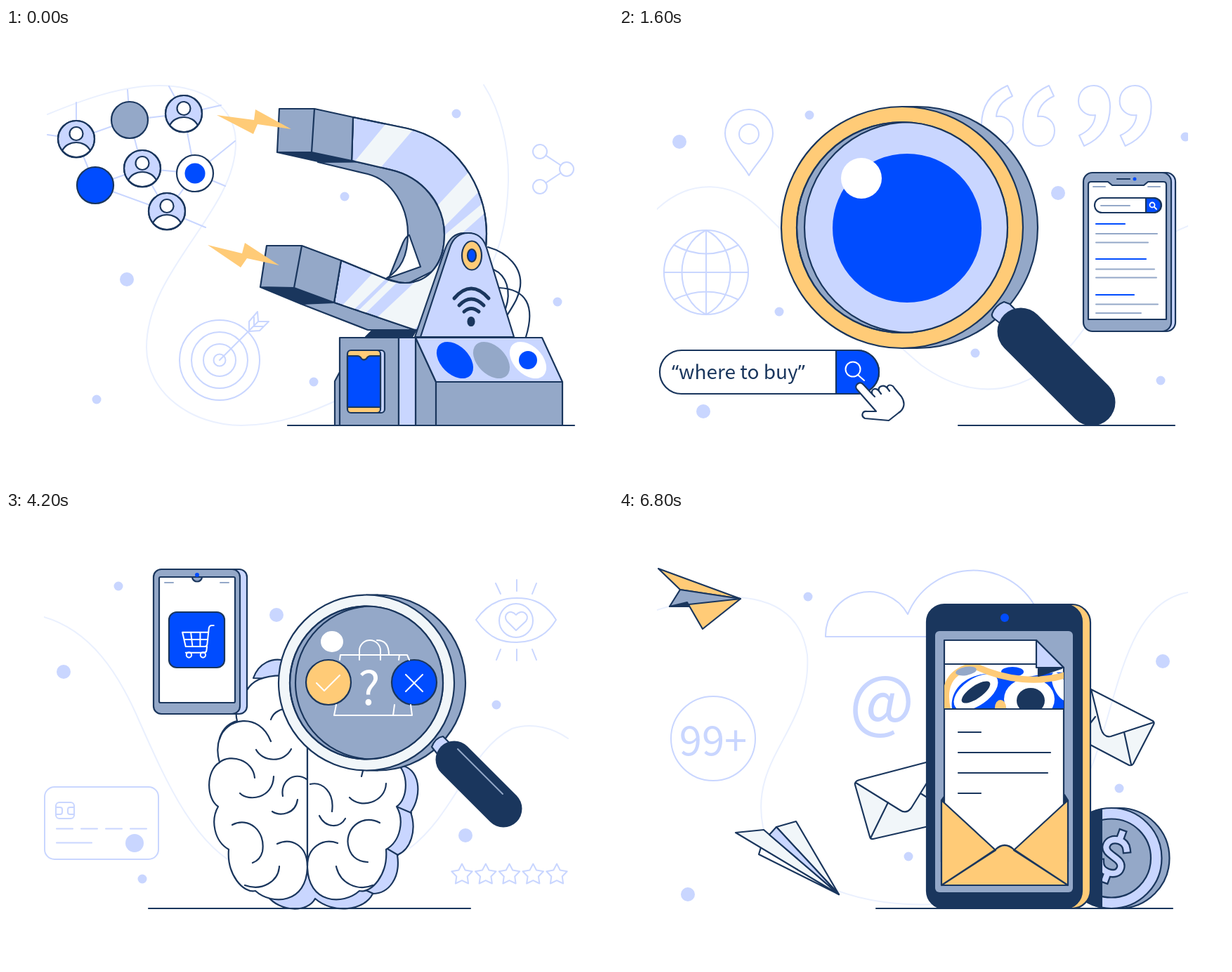
An HTML page that plays this animation: 864x648 px, repeating every 8 s.

```html
<!DOCTYPE html>
<html lang="en">
<head>
<meta charset="utf-8">
<title>Marketing scenes</title>
<style>
html, body { margin: 0; width: 100%; height: 100%; overflow: hidden; background: #fff; }
svg { display: block; width: 100vw; height: 100vh; }
text { font-family: 'Noto Sans CJK KR', 'Noto Sans CJK JP', 'Noto Sans', sans-serif; stroke: none; }
</style>
</head>
<body>
<svg id="stage" viewBox="0 0 864 648" fill="none" stroke="#1a365d" stroke-width="2.2" stroke-linecap="round" stroke-linejoin="round"></svg>
<script>
const navy = '#1a365d', blue = '#004cff', lilac = '#c9d6ff', slate = '#94a8c8',
  gold = '#ffcb77', ice = '#f1f6f9', white = '#fff', pale = '#eaf0fe';

// Shapes inherit fill and stroke from their group unless a fill is given.
const paint = f => f ? ` fill="${f}"` : '';
const p = (d, f) => `<path d="${d}"${paint(f)}/>`;
const c = (x, y, r, f) => `<circle cx="${x}" cy="${y}" r="${r}"${paint(f)}/>`;
const e = (x, y, rx, ry, f, turn = 0) =>
  `<ellipse cx="${x}" cy="${y}" rx="${rx}" ry="${ry}" transform="rotate(${turn} ${x} ${y})"${paint(f)}/>`;
const r = (x, y, w, h, rx, f) => `<rect x="${x}" y="${y}" width="${w}" height="${h}" rx="${rx}"${paint(f)}/>`;
const text = (x, y, size, s, f, more = '') => `<text x="${x}" y="${y}" font-size="${size}" fill="${f}" ${more}>${s}</text>`;
const g = (attrs, ...body) => `<g ${attrs}>${body.flat(9).join('')}</g>`;
const move = (m, ...body) => g(`transform="${m}"`, body);
const flip = (sum, ...body) => move(`matrix(-1 0 0 1 ${sum} 0)`, body);
const pen = (color, w, ...body) => g(`stroke="${color}" stroke-width="${w}"`, body);
const light = (...body) => pen(lilac, 2, body);
const flat = (f, ...body) => g(`fill="${f}" stroke="none"`, body);
const ground = (a, b) => p(`M${a} 566H${b}`);
const dots = list => flat(lilac, list.map(([x, y, k = 6.5]) => c(x, y, k)));

let clips = 0;
function clip(shape, ...body) {
  const id = 'clip' + clips++;
  return `<clipPath id="${id}">${shape}</clipPath>` + g(`clip-path="url(#${id})"`, body);
}
const wave = d => clip(r(54, 81, 756, 486, 0), pen(pale, 2, p(d)));

// Closed polygon from polar points [degrees, radius].
const polar = (x, y, pts) => 'M' + pts.map(([a, k]) => {
  const t = a * Math.PI / 180;
  return `${(x + k * Math.cos(t)).toFixed(1)} ${(y + k * Math.sin(t)).toFixed(1)}`;
}).join('L') + 'Z';
const times = (n, f) => Array.from({ length: n }, (_, i) => f(i));
const star = (x, y, k) => p(polar(x, y, times(10, i => [i * 36 - 90, i % 2 ? k * 0.52 : k])));

function dollar(m, f, stroke, edge) {
  const d = p('M12-14C9-20 4-21 0-21C-8-21-13-16-13-10C-13 3 13-3 13 11C13 17 8 21 0 21C-6 21-11 18-13 13M0-22V-30M0 22V30');
  return g(`transform="${m}" stroke-linecap="square"`, pen(stroke, 7 + edge * 2, d), pen(f, 7, d));
}

const cart = [
  p('M310 398H302Q291 398 289 410L282 478Q281 488 272 488H190L176 427H288M183 458H285M212 427L219 488M252 427V488M281 488L279 505Q278 514 268 514H190'),
  c(204, 524, 11), c(264, 524, 11)];

const badge = (x, y, k, f, core) => [c(x, y, k, f), core ? flat(core, c(x, y, k * 0.56)) : ''];

const user = (x, y) => move(`translate(${x} ${y})`, c(0, 0, 26, lilac),
  p('M-20 17C-13 1 13 1 20 17A26 26 0 0 1-20 17Z', white), c(0, 0, 26), c(0, -7.5, 9.5, white));

function magnet() {
  const body = p('M494 127L571 143C640 158 684 225 684 293C684 375 632 430 582 430L467 391L477 331L540 357C550 361 558 363 568 363C602 363 624 335 624 294C624 250 592 212 548 202L492 189Z', lilac);
  return [
    p('M545 356L565 306Q569 297 574 295L590 340ZM444 191L515 208C550 217 572 255 572 293C572 325 562 344 541 357L570 365L640 330L630 230L548 190ZM420 393L515 430H582L467 388Z', slate),
    p('M512 440L522 430H584L578 440Z', navy), body,
    clip(body, flat(ice, p('M494 193L550 125L581 143L528 205ZM600 268L668 195L684 222L612 295ZM618 300L690 240V256L620 318ZM474 400L526 345L546 352L484 412ZM520 420L600 345L634 330L640 370L580 430ZM492 412L548 357L557 362L502 416Z'))),
    body.replace(lilac, 'none'),
    p('M386 177H435L492 189L444 190ZM362 369L410 370L467 391L420 393Z', navy),
    p('M389 115H439L435 177H386ZM439 115L494 127L492 189L435 177ZM371 310H421L410 370L362 369ZM421 310L477 331L467 391L410 370Z', slate)];
}

function magnetScene() {
  const hub = [[100, 158], [176, 131], [253, 122], [194, 200], [269, 207], [127, 224], [229, 261]];
  const links = ['01', '12', '05', '13', '24', '34', '35', '36', '46', '56'].map(([a, b]) => `M${hub[a]}L${hub[b]}`).join('');
  const share = [[760, 176], [798, 201], [760, 226]];
  return [
    pen(pale, 2, p('M59 123C110 102 165 82 218 82C285 82 328 115 327 165C326 262 200 345 200 455C200 520 265 566 335 566C390 566 440 545 480 526M680 81C705 120 716 170 715 218C714 260 708 300 692 335')),
    light(p(links + 'M59 152L100 158V106M176 131L173 88M306 110L253 122L232 83M326 161L269 207L312 225M229 261L284 284'),
      p('M' + share.join('L')), share.map(s => c(...s, 10, white)),
      [57, 40, 23, 8.5].map(k => c(304, 473, k)),
      p('M304 473L359 418M346 432V418L358 404L359 418H374L361 431ZM353 412V425H367')),
    [0, 2, 3, 6].map(i => user(...hub[i])),
    badge(...hub[1], 26, slate), badge(...hub[4], 26, white, blue), badge(...hub[5], 26, blue),
    dots([[641, 122], [482, 240], [172, 358, 10], [785, 390], [438, 504], [129, 529]]),
    p('M686 312C715 320 735 342 732 368C730 384 722 395 714 408M694 344C712 352 720 374 711 400M702 370C740 372 754 395 740 440'),
    magnet(),
    flat(gold, p('M300 124L353 131L355 116L406 144L358 137L352 151ZM287 309L336 321L340 306L389 338L343 328L334 341Z')),
    p('M582 440L625 315C631 298 640 292 652 292H662L640 440Z', slate),
    p('M590 440L632 312C637 298 647 292 658 292C672 292 680 300 684 313L723 440Z', lilac),
    e(663, 324, 14, 20.5, gold), e(663, 324, 6, 9, blue),
    pen(navy, 5, p('M638 385Q662 357 687 385M645 395Q662 377 680 395M652 404Q662 395 673 404')), e(662, 418, 4.5, 6, navy),
    p('M468 566V503L475 490V441H559V566ZM475 490V566M583 441L612 504V566H583ZM612 504H792V566H612Z', slate),
    p('M559 441H583V566H559ZM583 441H763L792 504H612Z', lilac),
    [[639, blue], [691, slate], [743, white]].map(([x, f]) => flat(f, e(x, 473, 31, 20, f, 45))),
    flat(blue, c(743, 473, 13)),
    r(493, 459, 46, 89, 5, lilac), r(486, 459, 47, 89, 5, gold),
    p('M486 467H500Q504 467 506 471Q509 474 513 471Q515 467 519 467H533V540H486Z', blue),
    ground(401, 809)];
}

function pie(x, colors) {
  const cuts = [-90, -20, 31, 60, 185, 270];
  return colors.map((f, i) => p(polar(x, 302, [[0, 0], ...times(41, k => [cuts[i] + (cuts[i + 1] - cuts[i]) * k / 40, 81])]), f));
}

function adScene() {
  const bar = (x, y) => [r(x, y, 37, 186 - y, 0, slate), r(x, y, 27, 186 - y, 0, lilac)];
  const arm = 'M243 566C252 545 262 532 262 520C261 480 254 425 258 398C262 375 283 350 300 325C318 300 322 285 318 250C317 235 325 230 334 231C346 232 353 238 356 244';
  const palm = 'M353 425C378 455 388 505 386 566';
  const head = 'V154Q368 147 375 147H592Q599 147 599 154V';
  return [
    wave('M54 134C110 165 135 225 165 290C190 340 225 375 257 420M628 514C740 460 735 330 810 224'),
    dots([[150, 131, 10], [61, 226], [214, 430], [665, 155, 10], [697, 282]]),
    bar(188, 153), bar(236, 128), bar(284, 82), p('M175 186H335'),
    p('M620 210C640 195 658 190 669 194C681 200 682 217 672 226C650 240 640 255 620 271Z', ice),
    p('M620 484C640 462 652 456 660 446H620ZM500 103H592A35 35 0 0 1 627 138V566H500Z', slate),
    p('M355 566V137A34 34 0 0 1 389 103H577A34 34 0 0 1 611 137V566Z', gold),
    p(`M368 566${head}566Z`, lilac), p(`M368 197${head}197Z`, ice), r(382, 160, 202, 24, 12),
    r(386, 216, 195, 139, 5, white), p('M386 329V220Q386 216 390 216H577Q581 216 581 220V329Z', navy),
    pen(blue, 2.4, c(483, 273, 28)), pen(white, 4, p('M477 265V282L492 273.5Z', white)),
    flat(white, p('M385 566V380Q385 376 389 376H579Q583 376 583 380V566Z')),
    pen(slate, 2, p('M396 172H547M404 342H573M396 415.5H563M396 433.5H544')), p('M419 395H446'),
    flat(blue, c(484, 126, 7), c(399, 342, 6), r(385, 446, 198, 100, 0)),
    flat(gold, c(403, 394, 8)), flat(white, r(397, 457.5, 47, 7, 3.5)),
    text(573, 475, 25, 'Ad', white, 'font-weight="700" text-anchor="end"'),
    flat(ice, p(arm + 'V428L353 425' + palm.slice(8) + 'Z')), p(arm + 'V372L345 412' + palm),
    pie(226, [navy, blue, slate, slate, slate]), pie(215, [navy, blue, lilac, slate, white]),
    p('M606 302C606 288 620 280 645 270C660 265 672 273 672 290C672 308 665 313 650 318C630 326 607 328 606 302ZM605 360C605 345 620 336 645 330C662 326 671 338 671 352C671 370 662 376 645 379C625 385 606 384 605 360ZM603 428C603 412 615 405 640 401C658 398 666 410 666 428C666 445 655 450 638 451C615 453 603 445 603 428Z', ice),
    badge(773, 151, 35, white, blue), badge(744, 358, 35, blue), badge(203, 508, 35, slate),
    light(p('M107 371L70 405C50 425 51 455 70 469C92 484 116 478 130 463L162 426L149 413L122 446C114 456 106 459 95 456C77 451 70 430 83 417L120 384ZM94 383L107 396M149 441L136 429'),
      p('M684 495L695 547Q696 551 701 551H789Q794 551 795 547L804 495'), r(679, 485, 130, 10, 1, white),
      p('M716 488L738 448L746 452L726 488ZM771 488L750 448L742 452L763 488Z', white),
      times(4, i => r(705 + i * 23.5, 502, 7, 41, 3.5))),
    ground(169, 695)];
}

// Loupe: x is the front ring, dx the depth of its rim, inset that of the glass.
const loupe = (x, y, k, hole, dx, inset, rim, glass) => [
  c(x + dx, y, k, slate), p(`M${x} ${y - k}h${dx}M${x} ${y + k}h${dx}`),
  c(x, y, k, rim), c(x, y, hole, slate), clip(c(x, y, hole), c(x + inset, y, hole, glass)), c(x, y, hole)];

function searchScene() {
  const quote = p('M676 82C690 82 699 95 699 112C699 140 685 158 662 168L655 153C668 147 677 138 678 124C664 126 654 116 654 104C654 91 663 82 676 82Z');
  const mark = s => `<tspan font-family="Noto Sans, sans-serif">${s}</tspan>`;
  return [
    wave('M54 258C100 215 160 215 205 262C280 335 370 430 430 480C500 530 560 520 610 485C680 430 710 320 810 282'),
    clip(r(54, 81, 756, 486, 0), dots([[86, 162, 10], [271, 124], [228, 404], [120, 546, 10], [507, 463], [625, 235, 10], [771, 502], [806, 155]])),
    light(p('M185 210C175 192 151 172 151 150A34 34 0 0 1 219 150C219 172 195 192 185 210Z'), c(185, 151, 14),
      c(124, 348, 60), p('M124 288V408M64 348H184M124 288C78 310 78 386 124 408C170 386 170 310 124 288M78 309Q124 334 170 309M78 387Q124 364 170 387'),
      ['', 'translate(58.6)', 'rotate(180 607.5 125)', 'rotate(180 637 125)'].map(m => move(m, quote))),
    loupe(403, 284, 172, 150, 21, 11, gold, lilac),
    flat(blue, c(410, 285, 106)), flat(white, c(345, 214, 29)),
    p('M531 407C533 400 540 393 548 390L556 393L566 403L543 421L533 413Q530 410 531 407Z', lilac),
    pen(navy, 67, p('M572 432L673 533')), ground(483, 791),
    r(58, 459, 312, 62, 31, white), p('M309 459H339A31 31 0 0 1 339 521H309Z', blue),
    text(75, 500, 28, mark('“') + 'where to buy' + mark('”'), navy),
    pen(white, 2, c(333, 486, 10.5), p('M340 494L349 502')),
    p('M338 514C335 508 343 502 348 508L361 522C357 515 365 511 370 517C368 510 377 507 382 513C381 507 389 507 392 513L402 525C408 534 406 543 398 548L384 559L350 556C344 553 346 545 353 546H366ZM361 522L364 525M370 517L373 521M382 513L385 517', white),
    r(671, 206, 121, 226, 13, lilac), r(661, 206, 125, 226, 13, slate),
    p('M668 223Q668 219 672 219H696L702 224H747L753 219H775Q779 219 779 223V415H668Z', white),
    p('M709 215H727'), flat(blue, c(734, 215, 2.5)),
    r(677, 242, 95, 21, 10.5, white), p('M750 242H761A10.5 10.5 0 0 1 761 263H750Z', blue),
    pen(white, 1.8, c(759, 252, 3.5), p('M762 255L765 258')),
    pen(slate, 2, p('M675 226H692M753 226H770M686 253H727M679 293H766M679 305.5H753M679 343.5H762M679 355.5H765M679 393.5H767M679 406H743')),
    pen(blue, 2.2, p('M679 279H720M679 329H750M679 380H733'))];
}

function shoe(m) {
  const laces = p('M512 330C530 314 548 318 558 317M508 337C525 322 540 324 552 323M516 326L530 336M525 320L538 330M535 317L545 326');
  return move(m,
    p('M468 362C490 358 505 345 520 330C530 318 537 310 543 316C550 328 570 335 592 318L599 325C602 345 607 355 610 372V386H500Z', ice),
    p('M480 378C520 382 545 376 565 368C585 370 598 362 605 357L610 388H490Z', lilac),
    p('M532 376C545 362 565 359 580 359C592 357 598 350 602 345L605 356C595 367 580 371 565 369C550 368 542 375 532 376ZM499 344L510 334L526 336L518 346Z', blue),
    p('M545 338C558 325 580 326 588 345C582 357 562 358 545 349ZM497 352L536 354L512 377L494 373L510 360Z', slate),
    p('M536 320C540 300 570 298 574 320L566 325L557 318L545 322ZM574 326L579 311L595 322L592 331ZM458 370C461 358 472 358 478 363C488 374 515 380 545 384L610 387V389H478C458 386 455 380 458 370Z', navy),
    pen(navy, 5, laces), pen(white, 1.8, laces));
}

function shopScene() {
  const step = 47.6, edge = i => 341 + i * step, stripe = i => i % 2 ? gold : slate;
  const scallop = (x, w, y, base, f) => p(`M${x} ${y}V${base}a${w / 2} ${w / 2} 0 0 0 ${w} 0V${y}Z`, f);
  return [
    wave('M54 110C160 115 240 180 290 260C330 325 350 390 400 445M667 514C730 500 780 465 810 423'),
    dots([[712, 116, 10], [319, 160], [74, 284], [720, 357], [332, 534, 10], [804, 517]]),
    r(151, 190, 300, 177, 26, lilac), r(178, 228, 44, 39, 9, gold),
    p('M178 237.5H187Q193 237.5 193 243V253Q193 258 187 258H178M178 247.5H193M222 237.5H213Q207 237.5 207 243V253Q207 258 213 258H222M207 247.5H222'),
    p('M180 292H221M240 292H281M300 292H341M360 292H400M180 327H266'), flat(blue, c(366, 329, 21)),
    light(cart, c(735, 238, 54), c(735, 238, 42)), dollar('translate(736 238)', white, lilac, 2),
    r(400, 83, 265.5, 483, 30, slate), p('M655 159V212'), r(385, 83, 261, 483, 26, navy), flat(white, r(397, 105, 236, 433, 6)),
    clip(r(397, 180, 236, 90, 0), flat(navy, p('M409 230V218Q409 213 414 213L440 200H633V232H409Z'),
      times(5, i => scallop(409 + i * step, step, 220, 232)))),
    p('M632 106L579 178H632Z', slate),
    times(5, i => p(`M${397 + i * 47} 106h47L${edge(i + 1)} 178H${edge(i)}Z`, i % 2 ? gold : lilac)),
    times(5, i => scallop(edge(i), step, 178, 190, stripe(i))),
    scallop(579, 27, 178, 199, slate), scallop(606, 26, 178, 199, slate),
    r(405, 266, 219, 147, 0, gold), shoe('translate(-40 -3)'), shoe(''),
    p('M406 432H504'), pen(slate, 2, p('M406 454.5H616')), flat(blue, r(404, 483, 222, 41, 6)), pen(white, 2, p('M469 503H557')),
    ground(295, 754)];
}

function brainScene() {
  const half = p('M429 238C395 232 350 230 340 262C330 270 325 285 329 299C304 305 297 335 304 358C284 370 285 410 302 421C291 440 296 470 317 482C314 518 338 545 355 541C378 562 429 560 429 505Z', white);
  return [
    wave('M54 151C120 170 160 230 190 300C230 390 270 480 340 510M575 480C640 430 660 340 720 310C750 300 780 310 800 324'),
    dots([[160, 107], [82, 229, 10], [385, 148, 10], [194, 524], [654, 462, 10], [698, 276]]),
    p('M352 238C360 215 380 210 392 212L420 240ZM560 362C590 365 593 405 576 429C585 455 576 482 557 490C562 522 545 545 522 545C510 570 465 574 440 552C430 572 390 572 372 548L429 500L500 380Z', lilac),
    p('M556 421L577 430M541 480L558 490M503 536L523 545'), half, flip(858, half),
    p('M304 325C312 295 360 285 377 328M356 340C365 357 395 360 406 339M304 358C320 345 352 355 354 380M333 402C345 414 380 410 381 378M394 406C390 385 410 370 428 382M379 428C390 435 412 432 415 411M322 447C345 435 370 455 365 485Q362 497 351 501M386 474C405 465 428 475 429 505M340 533C365 542 388 527 389 506M377 297C380 288 388 283 396 282'),
    p('M433 389C450 385 468 400 464 428M446 434C455 452 475 452 483 438M489 408C505 425 540 415 541 388M506 378L508 370M532 444C505 430 480 455 488 480C492 495 505 500 515 500M429 505C429 480 450 465 472 473M470 506C475 530 500 542 522 533'),
    r(220, 83, 123, 206, 11, lilac), r(210, 83, 123, 206, 11, slate), r(218, 94, 108, 179, 2, white),
    p('M265 94A7 6.5 0 0 0 279 94Z', slate), flat(blue, c(272, 91, 3)), pen(slate, 2, p('M226 102H238M305 102H317')),
    r(232, 144, 79, 79, 11, blue), pen(white, 6, move('translate(192.5 30.5) scale(.333)', cart)),
    loupe(513, 244.5, 125, 109, 16, 8, ice, slate), flat(white, e(464, 186, 16, 15)),
    c(459, 244, 32, gold), c(581, 244, 32, blue),
    pen(white, 2, p('M491 205H571L574 212M467 291H578L576 276M476 205L475 212M470 276L467 291M476 205H491M559 212L560 205M553 276L551 291M503 212V199A15 15 0 0 1 533 199V212M528 184Q545 184 545 205'),
      p('M442 245L453 256L475 234M569 233L593 257M593 233L569 257')),
    text(517, 276, 66, '?', white, 'font-weight="500" text-anchor="middle"'),
    p('M606 336Q611 323 622 321L632 331L614 346Z', lilac),
    pen(navy, 53, p('M638 354L708 424')), pen(slate, 2, p('M643 339L707 403')),
    light(p('M669 155C690 125 715 124 727 124C740 124 765 125 783 155C765 185 740 187 727 187C710 187 690 185 669 155Z'), c(726, 156, 24),
      p('M726 170L713 157C706 148 718 138 726 148C734 138 747 148 740 157ZM697 103L704 118M727 98V114M755 103L749 118M704 197L698 212M727 197V213M749 197L755 212'),
      times(5, i => star(649 + i * 33.75, 518, 15.5)), r(55, 393, 162, 103, 14), r(71, 415, 26, 23, 5),
      p('M71 422H77Q80 422 80 425V429Q80 432 77 432H71M97 422H91Q88 422 88 425V429Q88 432 91 432H97'),
      p('M72 452.5H95M107 452.5H130M142 452.5H165M177 452.5H200M72 472.5H122')),
    flat(lilac, c(183, 473, 13)), ground(203, 661)];
}

function airplane() {
  const side = [r(15, -14, 7, 9, 2, gold), r(30, -6, 7, 9, 2, gold), p('M6-14L48 8V15L6 9ZM3 32L21 46V52L2 46Z', blue)];
  return move('translate(288 458) rotate(45)', side, flip(0, side),
    p('M0-53C6-53 7-44 7-38V15L2 46L0 53L-2 46L-7 15V-38C-7-44-6-53 0-53Z', white), p('M-4-43H4M0 36V53'));
}

function hornScene() {
  const legs = p('M448 507L464 460L480 507');
  const cone = f => p('M440 100C480 155 520 190 562 207L547 287C500 275 450 290 392 318Z', f);
  const bell = f => e(387, 202, 57, 108, f, 10), face = f => e(635, 257, 30, 43, f);
  const waves = pen(blue, 2.2, p('M443 438Q434 448 443 458M437 432Q424 448 437 464M430 427Q414 448 430 469'));
  const teeth = times(12, i => [[-9.5, 41], [-7, 54], [7, 54], [9.5, 41]].map(([a, k]) => [i * 30 - 90 + a, k])).flat();
  return [
    wave('M54 84C180 95 215 180 210 290C190 350 200 430 260 470C350 510 480 480 560 433M727 255C745 215 775 175 810 170'),
    dots([[773, 109, 10], [515, 139], [409, 356], [97, 409], [349, 543, 10], [758, 486]]),
    light(star(276, 209, 18.5), star(137, 506, 25.5), star(777, 369, 16.5)),
    c(162, 150, 67.5, ice), p(polar(162, 150, teeth), slate), c(162, 150, 34, gold), c(162, 150, 28),
    dollar('translate(162 150) scale(.68)', gold, navy, 3),
    c(206, 312, 67.5, blue),
    p('M154 327V318L158 312C166 307 176 306 185 304L196 294Q200 291 206 291H229Q239 291 246 302L256 306Q261 314 259 327Z', gold),
    p('M189 305L199 296H213V305ZM215 305V296H227Q231 298 234 305Z', lilac), p('M189 305V327M214 305V327M234 305V327M154 319H164M252 314H259'),
    [174, 238].map(x => [c(x, 326, 10, slate), c(x, 326, 5, white)]),
    c(287, 458, 67.5, slate), airplane(),
    c(464, 464, 67.5, lilac), p('M458 477L474 490L450 504M470 477L454 490L478 504M464 420V442'),
    pen(navy, 7.5, legs), pen(gold, 3.5, legs), e(456, 435, 4, 5.5, white), c(470, 448, 10.5, white), waves, flip(929, waves),
    r(580, 130, 146, 436, 24, blue), r(560, 130, 150, 436, 22, white), flat(navy, r(567, 167, 136, 376, 5)),
    flat(blue, e(636, 149.5, 4, 6)), flat(lilac, face()),
    clip(face(), p('M605 305V292Q607 281 627 276H643Q663 281 666 292V305Z', gold), p('M627 265V277Q635 290 643 277V265Z', ice)),
    p('M624 240Q622 268 635 270Q648 268 646 240Z', ice), p('M623 247C618 230 625 222 637 224C650 224 649 235 647 247L644 238Q634 240 628 236Z', navy),
    cone(white), clip(cone(), flat(ice, p('M440 240C490 238 530 243 562 253V330H390Z'))), cone(),
    e(393, 204, 66, 124, blue, 10), bell(lilac),
    clip(bell(), flat(ice, p('M320 230C350 218 400 222 450 250V330H320Z')), p('M371 181C395 193 420 194 450 192L438 243C410 228 390 217 362 212Z', gold)),
    bell(), e(366, 196, 8, 16, gold, 15),
    p('M597 230C608 230 614 240 613 255C611 275 604 288 596 291L581 289C592 270 597 255 597 230Z', blue),
    p('M562 207L594 215C600 245 590 270 580 292L546 285C558 260 566 235 562 207Z', slate), p('M573 228L588 232M572 238L587 241M570 247L585 250'),
    p('M584 332L636 348C650 353 650 375 648 395C645 410 640 414 632 413L570 394Z', gold),
    p('M579 330C592 332 596 345 594 355C590 375 585 392 578 394L562 388L572 345Z', lilac),
    p('M545 290C570 290 583 310 581 332C578 350 574 350 575 360L574 385C565 392 545 390 535 386L495 374C484 370 482 355 487 348C484 338 486 325 488 318C485 305 488 290 495 284C505 280 525 285 537 295Z', white),
    flat(lilac, p('M490 318C486 305 488 290 495 287L515 306L530 315L514 318L526 330L510 332L520 346L500 348L488 342Z')),
    p('M495 284C510 282 532 288 537 297C534 307 528 309 521 306C508 304 496 297 495 284ZM488 317C500 312 525 318 535 328C540 336 535 344 526 345C512 344 497 337 488 330M487 348C495 340 520 350 529 357M545 290C538 298 530 308 531 321C540 332 552 328 559 318'),
    p('M503 364C510 360 518 365 528 361L524 369L506 367Z', navy), ground(415, 778)];
}

function mailScene() {
  const art = [
    flat(blue, p('M474 282C470 250 500 228 540 232C580 245 600 228 633 230V282Z'), e(560, 229, 16, 7)),
    flat(white, e(508, 258, 36, 19, '', -35), e(584, 268, 36, 30), e(628, 250, 9, 22, '', -25)),
    flat(navy, e(508, 258, 24, 9, '', -35), e(586, 270, 20, 18)),
    pen(gold, 9, p('M468 284C460 250 470 228 505 220C550 242 600 246 640 232')),
    flat(slate, e(494, 228, 15, 6, '', -10)), flat(gold, e(543, 280, 8, 11))];
  const thin = 'font-weight="300" text-anchor="middle"';
  return [
    wave('M54 141C150 110 255 110 268 205C275 310 185 350 205 450C230 520 330 565 450 560M672 366C710 270 720 130 810 116'),
    dots([[269, 122], [774, 214, 10], [412, 492], [712, 395], [98, 546, 10]]),
    light(p('M438 179H294A62.5 62.5 0 0 1 411 147A101 101 0 0 1 590 132'), c(134, 324, 60)),
    text(134, 348, 58, '99+', lilac, thin), text(374, 306, 98, '@', lilac, thin),
    p('M56 82L173 125L87 112ZM97 130L173 125L119 168Z', gold), p('M87 112L173 125L72 136Z', slate), p('M72 136L97 130L100 136Z', navy),
    p('M202 479L199 489L313 546Z', white), p('M166 458L206 454L313 546ZM224 450L252 442L313 546Z', ice), p('M214 461L224 450L313 546Z', lilac),
    p('M342 383L460 352L480 440L362 467Q358 468 357 464L336 390Q335 385 342 383ZM337 387L400 426Q409 432 416 423L460 352M383 415L358 466M429 402L445 412', ice),
    p('M668 252L758 298Q763 300 761 304L732 360Q730 363 726 362L650 322ZM672 254L686 310Q690 323 700 321L761 301M719 315L729 361M668 306L678 293', ice),
    c(712, 494.5, 71.5, slate), c(701, 494.5, 71.5, lilac), c(701, 494.5, 56, slate),
    dollar('translate(704 492) rotate(20) scale(1.15)', lilac, navy, 2),
    clip(c(701, 494.5, 72.5), flat(navy, r(630, 420, 58, 150, 0))),
    r(455, 133, 216, 433, 26, gold), r(438, 133, 221, 433, 25, navy), flat(slate, r(450, 171, 196, 372, 6)), flat(blue, c(549, 152, 6)),
    p('M459 412L465 404H634L639 412V500H459Z', navy), p('M463 184H594L633 223V510H463Z', white),
    clip(r(463, 218, 170, 64, 0), art), p('M463 218H594M463 282H633'),
    p('M597 224H630L597 235Z', navy), p('M594 184V223H633Z', lilac),
    p('M483 315H515M483 344H614M483 373H610M483 402H515'),
    p('M459 412L536 483L459 533ZM639 412L562 483L639 533ZM459 533L536 482Q549 470 562 482L639 533Z', gold),
    ground(366, 788)];
}

const scenes = [magnetScene, adScene, searchScene, shopScene, brainScene, hornScene, mailScene];
const ends = [300, 1600, 2900, 4200, 5500, 6800, 8000];
const stage = document.getElementById('stage');
stage.innerHTML = scenes.map(draw => g('', draw())).join('');
const layers = [...stage.children];

function update(ms) {
  const now = ends.findIndex(end => ms % 8000 < end);
  layers.forEach((layer, i) => layer.setAttribute('display', i === now ? 'inline' : 'none'));
}
const start = performance.now();
function tick() {
  update(performance.now() - start);
  requestAnimationFrame(tick);
}
update(0);
requestAnimationFrame(tick);
</script>
</body>
</html>
```
